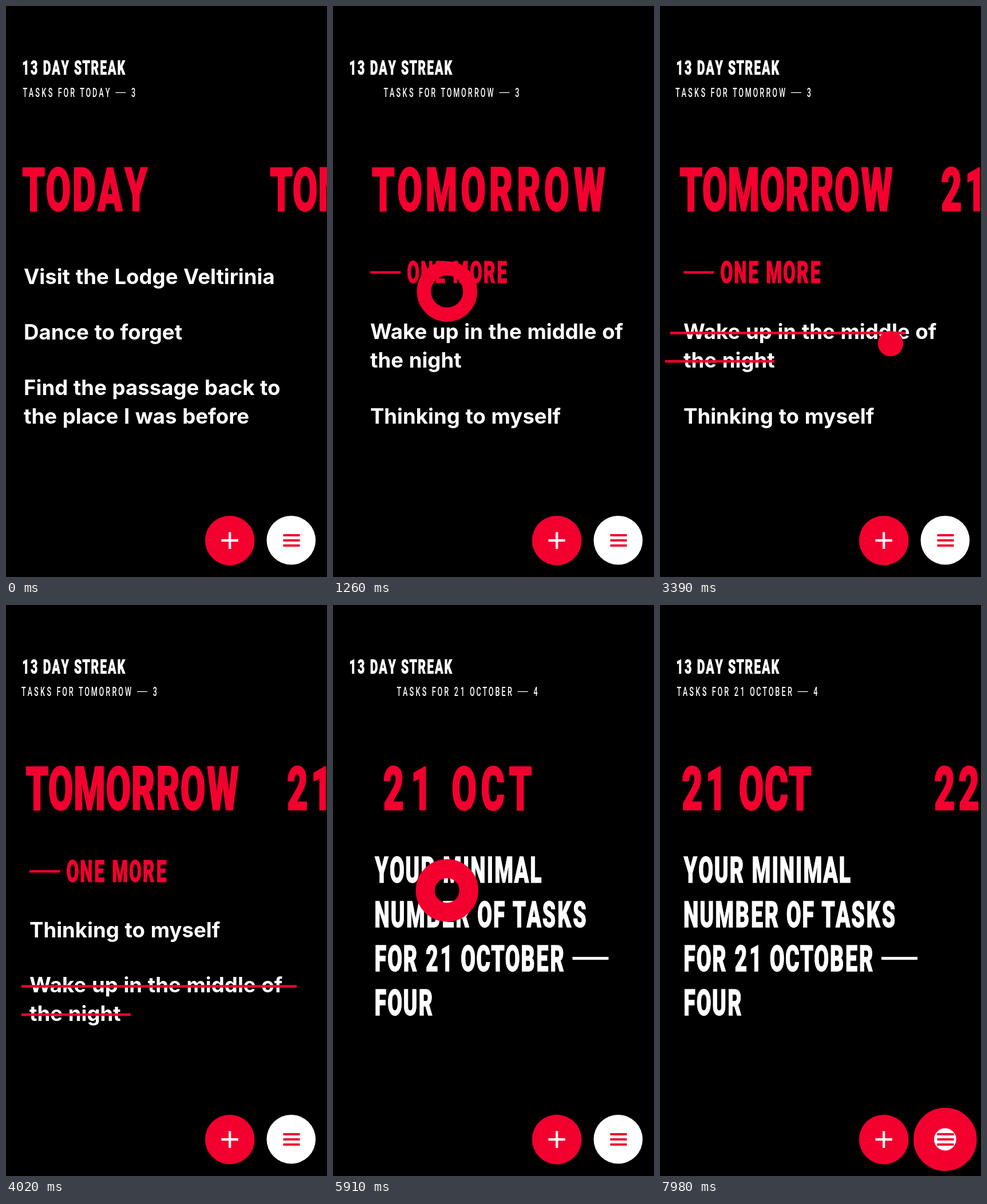
Write an HTML page that moves like this. It is 561 px wide and 998 px high and loops after 8000 ms.

```html
<!DOCTYPE html>
<html lang="en">
<head>
<meta charset="utf-8">
<title>Task list</title>
<style>
html, body { margin: 0; width: 100%; height: 100%; overflow: hidden; background: #000; }
svg { display: block; width: 100vw; height: 100vh; }
text { white-space: pre; }
.display { font-family: Roboto, "Liberation Sans", sans-serif; text-anchor: middle; }
.task { font: 700 36.6px Inter, "Open Sans", sans-serif; word-spacing: 1px; fill: #fff; }
</style>
</head>
<body>
<svg id="stage" viewBox="0 0 561 998"></svg>
<script>
const RED = "#f3002f", WHITE = "#fff";
const LOOP = 8000, SWIPE_1 = 300, STRIKE = 2640, SWIPE_2 = 4980, TAP = 7110;
const PAGE = 561, CONDENSE = 0.6;
const stage = document.getElementById("stage");

function add(parent, tag, attrs = {}, content) {
  const el = document.createElementNS("http://www.w3.org/2000/svg", tag);
  for (const k in attrs) el.setAttribute(k, attrs[k]);
  if (content) el.textContent = content;
  parent.appendChild(el);
  return el;
}
const shift = (el, x, y = 0) => el.setAttribute("transform", `translate(${x.toFixed(2)} ${y.toFixed(2)})`);
const mix = (a, b, p) => a + (b - a) * p;
const smooth = (a, b, t) => {
  const x = Math.min(1, Math.max(0, (t - a) / (b - a)));
  return x * x * (3 - 2 * x);
};

// S-curve whose tail slows down past the knee
function glide(t, mid, knee, rate = 0.0118) {
  let z = (t - mid) * rate;
  if (z > knee) z = knee + (z - knee) * 0.64;
  return 1 / (1 + Math.exp(-z));
}
const captionMove = s => smooth(60, 1380, s);
const listMove = (s, lead = 0) => s <= 0 ? 0 : glide(s + lead, 692, 3);

// Titles leave letter by letter and arrive with wide, closing letter spacing
const titleOut = (s, i) => s <= 0 ? 0 : -PAGE * glide(s - i * 12.5, 674, 1.45);
function titleIn(s, i, distance) {
  if (s <= 0) return distance;
  const c = captionMove(s);
  return distance * (1 - glide(s, 762, 2.46, 0.0124)) + 242 * c * (1 - c) ** 2.5 * i;
}

// Condensed caps: advance widths in thousandths of the font size
const ADVANCE = { " ": 160, C: 384, E: 352, F: 336, I: 184, K: 408, L: 332, M: 520, N: 416, S: 374, T: 352, W: 554 };
const advance = c => (ADVANCE[c] || (c >= "0" && c <= "9" ? 370 : 393)) / 1000;

function display(parent, str, x, y, size, track, fill, bold = true) {
  const centers = [], edge = bold ? size * 0.02 : 0;
  let pen = x;
  for (const c of str) {
    const w = size * (c === "—" ? (bold ? 1 : 0.87) : advance(c));
    centers.push(pen + w / 2);
    if (c === "—") {
      const h = size * (bold ? 0.078 : 0.06);
      add(parent, "rect", { x: pen + size * 0.015, y: y - size * 0.354 - h / 2, width: w - size * 0.03, height: h, fill });
    }
    pen += w + track;
  }
  const el = add(parent, "text", {
    class: "display", y: y - edge / 2, fill, stroke: fill, "stroke-width": edge,
    "font-size": size * (bold ? 0.96 : 0.985), "font-weight": bold ? 900 : 500,
    transform: `scale(${CONDENSE} 1)`
  }, str.replace("—", " "));
  const place = offset => el.setAttribute("x",
    centers.map((c, i) => ((c + offset(i)) / CONDENSE).toFixed(2)).join(" "));
  place(() => 0);
  return place;
}

function taskRow(x, ...lines) {
  const g = add(stage, "g");
  for (const [str, y] of lines) add(g, "text", { class: "task", x, y }, str);
  return g;
}

// Header and captions
display(stage, "13 DAY STREAK", 27.5, 120.5, 37, 1.2, WHITE);
const captions = [["TODAY — 3", 29.5], ["TOMORROW — 3", 27.2], ["21 OCTOBER — 4", 29.5]].map(([str, x]) => {
  const g = add(stage, "g");
  display(g, "TASKS FOR " + str, x, 159, 21.5, 2.8, WHITE, false);
  return g;
});

// Day titles
const title = (str, x, track) => display(stage, str, x, 358.7, 110, track, RED);
const today = title("TODAY", 29, 2);
const tomorrow = title("TOMORROW", 35, 0.2);
const oct21 = title("21 OCT", 36, 1);
const oct22 = title("22 OCT", 477, 1.8);

// Lists
const todayRows = [
  taskRow(31, ["Visit the Lodge Veltirinia", 485.5]),
  taskRow(31, ["Dance to forget", 582.5]),
  taskRow(31, ["Find the passage back to", 679.7], ["the place I was before", 729.5])
];
const more = add(stage, "g");
display(more, "—", 40.2, 485, 55, 0, RED);
display(more, "ONE MORE", 105.5, 485, 55, 1.7, RED);
const wake = taskRow(41, ["Wake up in the middle of", 582], ["the night", 632]);
const strikes = [571.5, 621].map(y => add(wake, "rect", { y: y - 2.3, height: 4.6, fill: RED }));
const think = taskRow(41, ["Thinking to myself", 729.5]);
const goal = add(stage, "g");
["YOUR MINIMAL", "NUMBER OF TASKS", "FOR 21 OCTOBER —", "FOUR"].forEach((str, i) =>
  display(goal, str, 40.6, 485.8 + i * 77.4, 65, 1.35, WHITE));

// Buttons
add(stage, "circle", { cx: 391.2, cy: 934.2, r: 43.3, fill: RED });
add(stage, "path", { d: "M376.5 934.2h29.4M391.2 919.5v29.4", stroke: WHITE, "stroke-width": 4.2 });
add(stage, "circle", { cx: 498.3, cy: 933.8, r: 42.8, fill: WHITE });
add(stage, "path", { d: "M484.5 925h29M484.5 934h29M484.5 943h29", stroke: RED, "stroke-width": 4.2 });

const finger = add(stage, "circle", { fill: "none", stroke: RED });

// Touch marker: pops in, shrinks while held, bursts into a ring after the peak
function touch(s, peak, x, y) {
  let outer, hole = 0;
  if (s < 150) outer = 60 * smooth(0, 150, s);
  else if (s < peak) outer = mix(60, 21.5, smooth(150, 480, s)) + 39.5 * smooth(peak - 150, peak, s);
  else {
    outer = 61 - 0.063 * (s - peak);
    hole = 0.213 * (s - peak);
  }
  const width = Math.max(0, outer - hole);
  finger.setAttribute("cx", x);
  finger.setAttribute("cy", y);
  finger.setAttribute("r", width ? (outer + hole) / 2 : 0);
  finger.setAttribute("stroke-width", width);
}

function drawFinger(t) {
  const swipe = s => touch(s, 830, mix(400, 199.3, smooth(150, 831, s)), 498.9);
  if (t < STRIKE) swipe(Math.max(0, t - SWIPE_1));
  else if (t < SWIPE_2) touch(t - STRIKE, 890, mix(80, 432, smooth(150, 880, t - STRIKE)), 590);
  else if (t < TAP) swipe(t - SWIPE_2);
  else touch(t - TAP, 780, 498.3, 934);
}

function draw(t) {
  const s1 = t - SWIPE_1, s2 = t - SWIPE_2, sk = t - STRIKE;

  const c1 = captionMove(s1), c2 = captionMove(s2);
  shift(captions[0], titleOut(s1, 6));
  shift(captions[1], 258 * (1 - c1) + titleOut(s2, 6));
  shift(captions[2], 306 * (1 - c2));
  captions[1].setAttribute("opacity", Math.min(1, c1 / 0.72));
  captions[2].setAttribute("opacity", Math.min(1, c2 / 0.72));

  today(i => titleOut(s1, i));
  tomorrow(i => titleIn(s1, i, 427) + titleOut(s2, i));
  oct21(i => titleIn(s1, i + 9, 428) + titleIn(s2, i, 453));
  oct22(i => titleIn(s2, i + 7, 453));

  const leave = (s, slot) => -PAGE * listMove(s, 80 + 26 * slot);
  const enter = s => PAGE * (1 - listMove(s));
  const swap = smooth(880, 1380, sk);
  todayRows.forEach((row, slot) => shift(row, leave(s1, slot)));
  shift(more, enter(s1) + leave(s2, 0));
  shift(think, enter(s1) + leave(s2, 1), -149 * swap);
  shift(wake, enter(s1) + leave(s2, 2), 95 * swap);
  shift(goal, enter(s2));

  [[508, 60, 950], [218, 218, 880]].forEach(([end, lag, stop], i) => {
    const q = smooth(150, stop, sk), left = 27 - lag * (1 - q);
    strikes[i].setAttribute("x", left);
    strikes[i].setAttribute("width", sk > 0 ? Math.max(0, end * q - left) : 0);
  });

  drawFinger(t);
}

const start = performance.now();
function tick() {
  draw((performance.now() - start) % LOOP);
  requestAnimationFrame(tick);
}
tick();
</script>
</body>
</html>
```
